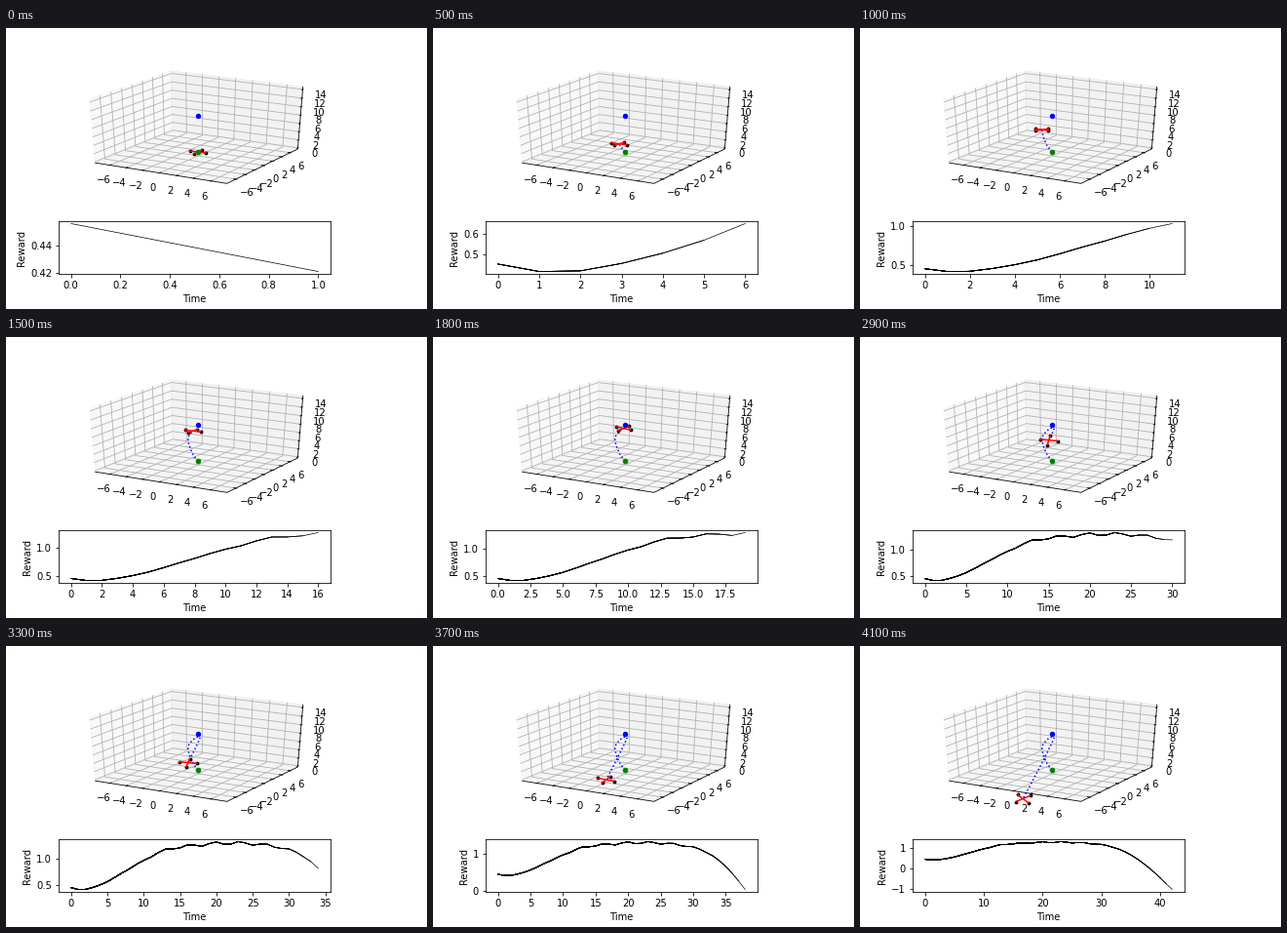
A matplotlib script that plays this animation: 432 by 288 pixels, repeating every 4.2 s.

```python
import numpy as np
import matplotlib.pyplot as plt
from matplotlib.animation import FuncAnimation

W, H, DPI = 432, 288, 72
FRAMES, INTERVAL = 42, 100

# Box view: half size of the cube, eye distance, pixel scale and centre
HALF, DIST = 0.5 + 1 / 48, 10.0
KX, KY = 149.7, 71.4
CX, CY = 197.2, 99.6
ELEV, AZIM = np.radians(30), np.radians(-60)
SPAN, TOP = 15, 14.3
LABEL_GAP, LABEL_DROP = 0.09, 2.2

START, GOAL = (197.2, 127.2), (197.2, 90.3)
ARM = 9.3

# Drone on screen: step, x, y, yaw in degrees, apparent depth of its disc
POSES = [(0, 197, 127, 25, 2.3), (5, 191, 118.7, 35, 1.8),
         (10, 186.7, 104.3, 45, 1.3), (15, 191.8, 96.3, 30, 1.8),
         (22, 199, 93.5, 46, 4.3), (29, 193.8, 105.7, 10, 5),
         (37, 177.7, 137, 26, 3.6), (41, 167.2, 156.5, 53, 5.2)]

# Reward trend: step, value
TREND = [(0, 0.456), (1, 0.421), (4, 0.507), (8, 0.81), (13, 1.165),
         (17, 1.25), (23, 1.295), (28, 1.23), (31, 1.12), (34, 0.82),
         (38, 0.05), (42, -1.03)]


def smooth(keys, t):
    """Cubic Hermite curve through the keyed values."""
    keys = np.array(keys, float)
    ts, vals = keys[:, 0], keys[:, 1:]
    slopes = np.gradient(vals, ts, axis=0)
    i = min(np.searchsorted(ts, t, side="right") - 1, len(ts) - 2)
    span = ts[i + 1] - ts[i]
    s = (t - ts[i]) / span
    return ((1 + 2 * s) * (1 - s) ** 2 * vals[i]
            + s * (1 - s) ** 2 * span * slopes[i]
            + s * s * (3 - 2 * s) * vals[i + 1]
            + s * s * (s - 1) * span * slopes[i + 1])


def reward(t):
    """Trend with a small regular wobble while the drone hovers."""
    hover = np.sin(np.pi * np.clip((t - 7) / 27, 0, 1))
    return smooth(TREND, t)[0] - 0.033 * hover * np.cos(2 * np.pi * (t - 18) / 3.5)


def project(x, y, z):
    """Screen position of a point in the centred unit cube."""
    ce, se, ca, sa = np.cos(ELEV), np.sin(ELEV), np.cos(AZIM), np.sin(AZIM)
    right = -sa * x + ca * y
    up = -se * (ca * x + sa * y) + ce * z
    near = ce * (ca * x + sa * y) + se * z
    scale = DIST / (DIST - near)
    return CX + KX * right * scale, CY - KY * up * scale


def segment(ax, points, **style):
    ax.plot(*zip(*(project(*p) for p in points)), **style)


def pane(ax, points, shade):
    color = (shade,) * 3 + (0.5,)
    ax.fill(*zip(*(project(*p) for p in points)), fc=color, ec=color, lw=1)


def tick_label(ax, value, point):
    x, y = project(*point)
    ax.text(x, y + LABEL_DROP, str(value).replace("-", "\u2212"),
            ha="center", va="top")


def draw_box(ax):
    lo, hi = -HALF, HALF
    pane(ax, [(lo, lo, lo), (lo, hi, lo), (lo, hi, hi), (lo, lo, hi)], 0.95)
    pane(ax, [(lo, hi, lo), (hi, hi, lo), (hi, hi, hi), (lo, hi, hi)], 0.90)
    pane(ax, [(lo, lo, lo), (hi, lo, lo), (hi, hi, lo), (lo, hi, lo)], 0.925)

    grid = dict(color="#b0b0b0", lw=0.8)
    edge = dict(color="black", lw=0.8)
    flat = [(v, v / SPAN) for v in range(-6, 7, 2)]
    tall = [(v, v / TOP - 0.5) for v in range(0, 15, 2)]
    for _, p in flat:
        segment(ax, [(p, lo, lo), (p, hi, lo), (p, hi, hi)], **grid)
        segment(ax, [(hi, p, lo), (lo, p, lo), (lo, p, hi)], **grid)
    for _, p in tall:
        segment(ax, [(lo, lo, p), (lo, hi, p), (hi, hi, p)], **grid)
    segment(ax, [(lo, lo, lo), (hi, lo, lo), (hi, hi, lo), (hi, hi, hi)], **edge)

    out, inn, far = HALF + 0.1 / 12, HALF - 0.2 / 12, HALF + LABEL_GAP
    for v, p in flat:
        segment(ax, [(p, -out, lo), (p, -inn, lo)], **edge)
        segment(ax, [(out, p, lo), (inn, p, lo)], **edge)
        tick_label(ax, v, (p, -far, -far))
        tick_label(ax, v, (far, p, -far))
    for v, p in tall:
        segment(ax, [(hi, out, p), (hi, inn, p)], **edge)
        tick_label(ax, v, (far, far, p))


def padded(lo, hi):
    pad = 0.05 * (hi - lo)
    return lo - pad, hi + pad


plt.rcParams.update({"font.family": "DejaVu Sans", "font.size": 10})
fig = plt.figure(figsize=(W / DPI, H / DPI), dpi=DPI, facecolor="white")

scene = fig.add_axes([0, 0, 1, 1])
scene.set(xlim=(0, W), ylim=(H, 0))
scene.axis("off")
draw_box(scene)

trail, = scene.plot([], [], "b:", lw=1.5)
rotors, = scene.plot([], [], "ko", ms=2.8)
arms = [scene.plot([], [], "r-", lw=1.5)[0] for _ in range(2)]
scene.plot(*START, "o", color="green", ms=4.6)
scene.plot(*GOAL, "o", color="blue", ms=4.4)

chart = fig.add_axes([54 / W, 36 / H, 279 / W, 54 / H])
chart.set_xlabel("Time")
chart.set_ylabel("Reward")
rewards = [reward(t) for t in range(FRAMES + 1)]
# Each step plots the history again, so older parts grow darker
curves = [chart.plot(rewards[:n + 2], "k-", lw=0.7)[0] for n in range(FRAMES)]

poses = np.array([smooth(POSES, k) for k in range(FRAMES)])


def update(k):
    trail.set_data(*poses[:k + 1, :2].T)
    x, y, yaw, depth = poses[k]
    tips = []
    for arm, turn in zip(arms, (0, -90)):
        angle = np.radians(yaw + turn)
        dx, dy = ARM * np.cos(angle), depth * np.sin(angle)
        ends = [(x - dx, y - dy), (x + dx, y + dy)]
        arm.set_data(*zip(*ends))
        tips += ends
    rotors.set_data(*zip(*tips))

    for n, curve in enumerate(curves):
        curve.set_visible(n <= k)
    shown = rewards[:k + 2]
    chart.set_xlim(*padded(0, k + 1))
    chart.set_ylim(*padded(min(shown), max(shown)))


anim = FuncAnimation(fig, update, frames=FRAMES, interval=INTERVAL,
                     repeat=True, repeat_delay=0, init_func=lambda: None)
plt.show()
```
